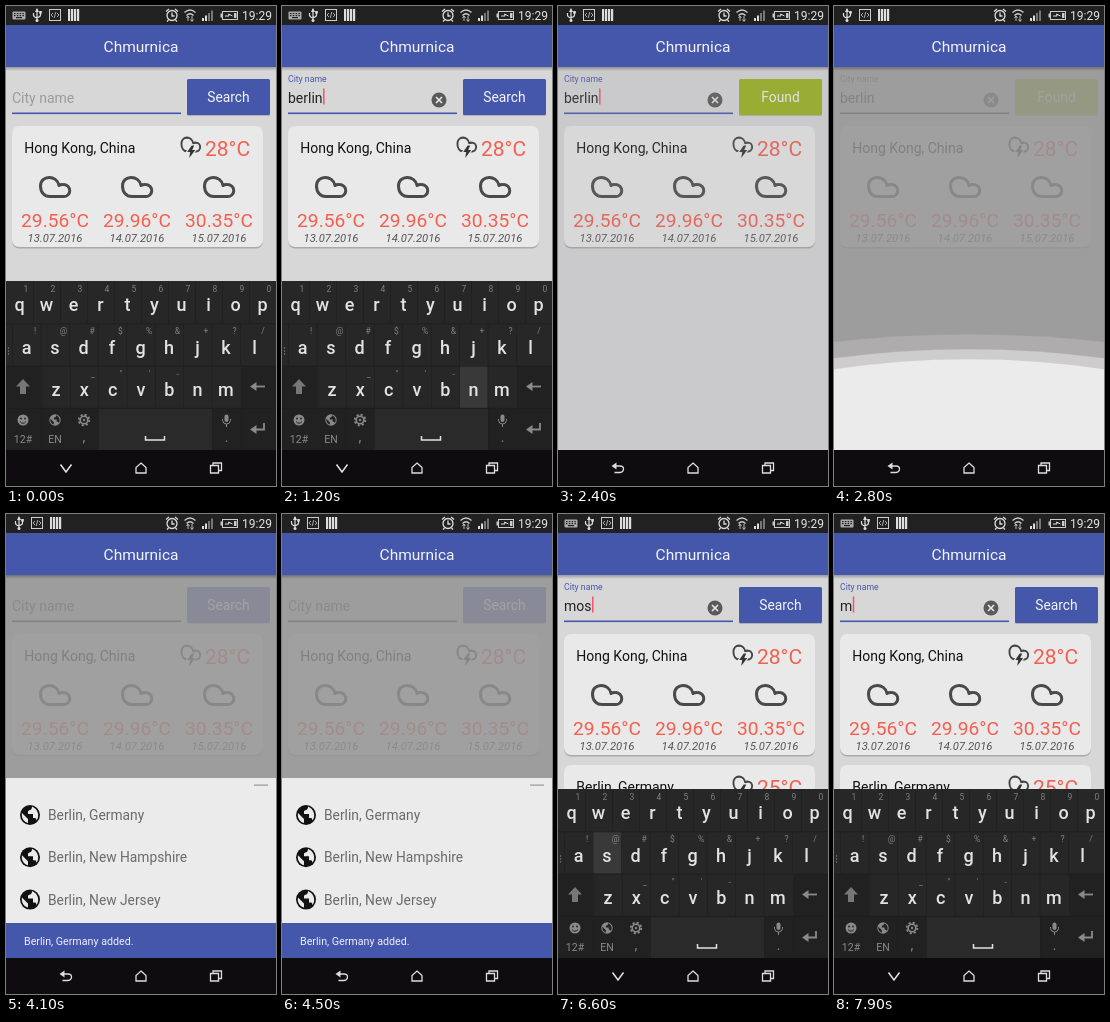
Animation of 270x480 px, one loop 8000 ms. Source, as an HTML page:

```html
<!DOCTYPE html>
<html lang="en">
<head>
<meta charset="utf-8">
<title>Weather app</title>
<style>
  html, body { margin: 0; width: 100%; height: 100%; overflow: hidden; background: #000; }
  svg { display: block; width: 100vw; height: 100vh; }
  text { font-family: Roboto, "Noto Sans", sans-serif; white-space: pre; }
</style>
</head>
<body>
<svg id="stage" viewBox="0 0 270 480" xmlns="http://www.w3.org/2000/svg"></svg>
<script>
const LOOP = 8000;
const INDIGO = '#4457ab', RED = '#f2604f', LIGHT = '#e9e9ea';

// Markup helpers
const rect = (x, y, w, h, fill, more = '') =>
  `<rect x="${x}" y="${y}" width="${w}" height="${h}" fill="${fill}" ${more}/>`;
const text = (str, x, y, size, fill, more = '') =>
  `<text x="${x}" y="${y}" font-size="${size}" fill="${fill}" ${more}>${str}</text>`;
const mid = (str, x, y, size, fill, more = '') =>
  text(str, x, y, size, fill, `text-anchor="middle" ${more}`);
const line = (d, color, w = 1, more = '') =>
  `<path d="${d}" fill="none" stroke="${color}" stroke-width="${w}" ${more}/>`;
const shape = (d, fill) => `<path d="${d}" fill="${fill}"/>`;
const dot = (x, y, r, fill, more = '') => `<circle cx="${x}" cy="${y}" r="${r}" fill="${fill}" ${more}/>`;
const group = (id, body, more = '') => `<g id="${id}" ${more}>${body}</g>`;
const at = (x, y, body) => `<g transform="translate(${x} ${y})">${body}</g>`;

// Weather card
const cloud = (color, w) => line(
  'M-5 9.600H8.500A6 6 0 0 0 9-2.400Q6-3 4-1.500C2-12.500-14.500-12-14.500-1C-14.500 5-11 9.600-5 9.600Z',
  color, w, 'stroke-linejoin="round"');
const bolt = 'M1 1L-3.500 7.500H-.5L-1.500 13.500L4.500 5.500H1.500L3.500 1Z';
const storm = `<g transform="scale(.64 .72)">${cloud('#444', 3)}</g>`
  + line(bolt, LIGHT, 2.400) + shape(bolt, '#333');

function card(y, city, temp, days) {
  return at(6, y,
    rect(0, .5, 251, 121, '#aaa', 'rx="7"') + rect(0, -1, 251, 121, LIGHT, 'rx="7"')
    + text(city, 12.300, 26, 14, '#111') + at(178.700, 17.500, storm)
    + text(temp, 193, 28.500, 21, RED)
    + days.map(([deg, date], i) => {
      const x = 43 + 82 * i;
      return at(x, 60, cloud('#4a4a4a', 3))
        + mid(deg, x, 100, 19.200, RED)
        + mid(date, x, 115, 11.300, '#555', 'font-style="italic"');
    }).join(''));
}

const globe = (r, fg, bg) => dot(0, 0, r, fg)
  + `<g transform="scale(${r / 10})">`
  + shape('M-8-2L-2 4V8C-6 7-9 3-8-2ZM2-8.500C2-5 0-5-2-4V-1H3V3H5C6 3 6.500 5 6.500 5.500C10 1 8-6 2-8.500Z', bg) + '</g>';

// Keyboard
const ROW = 42.300, TOP = 275;
const rows = [
  { keys: 'qwertyuiop', hints: '1234567890', x: 13.500, step: 27 },
  { keys: 'asdfghjkl', hints: '!@#$%&+?/', x: 20.500, step: 28.500 },
  { keys: 'zxcvbnm', hints: ' _"\'-  ', x: 50, step: 28.300 },
];
const KEY = '#e2e2e2', ICON = '#8a8a8a', HINT = '#808080', EDGE = '#1f1e1f', SIDE = '#222122';
const escapeChar = c => c === '&' ? '&amp;' : c;
const hit = {};

function keyboard() {
  let out = rect(0, TOP, 270, 170, '#282728')
    + rect(0, TOP + 2 * ROW, 35, ROW, SIDE) + rect(235, TOP + 2 * ROW, 35, ROW, SIDE)
    + rect(0, TOP + 3 * ROW, 270, ROW, SIDE) + rect(92, TOP + 3 * ROW + 1, 114, ROW, '#2b2a2b')
    + rect(0, 0, 0, 0, '#3a393a', 'id="press"');
  for (let r = 1; r < 4; r++) out += rect(0, TOP + r * ROW, 270, 1, EDGE);
  rows.forEach(({ keys, hints, x, step }, r) => [...keys].forEach((c, i) => {
    const cx = x + i * step, y = TOP + r * ROW;
    hit[c] = [cx - step / 2, y, step];
    if (i || r) out += rect(cx - step / 2, y, .6, ROW, EDGE);
    out += mid(c, cx, y + 30.300, 18, KEY, 'font-weight="500"')
      + mid(escapeChar(hints[i]), cx + (r ? 8.500 : 6.500), y + 11, 8.500, HINT);
  }));
  hit['<'] = [235, TOP + 2 * ROW, 35];
  [35, 63, 92, 206, 235].forEach(x => out += rect(x, TOP + 3 * ROW, .6, ROW, EDGE));
  out += [0, 3, 6].map(d => dot(2.500, 342 + d, .7, HINT)).join('')
    + shape('M17 373L24 380.500H20V388H14V380.500H10Z', '#777')
    + line('M259 380.500H249', ICON, 1.8) + shape('M244 380.500L250.500 376V385Z', ICON);
  // Bottom row
  out += dot(17, 414, 5.500, ICON) + dot(15, 412.500, .9, SIDE) + dot(19, 412.500, .9, SIDE)
    + line('M14 415.500Q17 419 20 415.500', SIDE)
    + at(49, 414, globe(5.700, ICON, SIDE))
    + dot(78, 414, 3.800, 'none', `stroke="${ICON}" stroke-width="1.6"`)
    + dot(78, 414, 5.300, 'none', `stroke="${ICON}" stroke-width="1.8" stroke-dasharray="2.1 2.06"`)
    + dot(78, 414, 1.200, ICON)
    + mid('12#', 17, 437, 10.500, ICON) + mid('EN', 49, 437, 10.500, ICON) + mid(',', 78, 436, 14, ICON)
    + line('M139.500 430V434H158.500V430', KEY, 1.5)
    + rect(218.500, 408.500, 4, 7.500, ICON, 'rx="2"')
    + line('M216.500 413V414.500Q217 418 220.500 418T224.500 414.500V413M220.500 418V421', ICON)
    + mid('.', 220.500, 436, 14, ICON)
    + line('M258 417V423.500H249', ICON, 1.8) + shape('M244 423.500L250.500 419V428Z', ICON);
  return out;
}

// System bars
function statusBar() {
  const usb = line('M0-6V6M-3.500-2V0Q-3.500 2 0 3M3.500-3V0Q3.500 2 0 2.500', '#ddd', 1.2)
    + shape('M-2-3L0-7L2-3Z', '#ddd') + dot(0, 5.500, 1.5, '#ddd') + rect(2.200, -4, 2.600, 2.600, '#ddd');
  const code = rect(-5.500, -5.500, 11, 11, 'none', 'stroke="#ccc"')
    + line('M-2-2L-4 0L-2 2M2-2L4 0L2 2M.8-3L-.8 3', '#ccc', .8);
  const bars = [-5, -2, 1, 4].map(x => rect(x, -6, 2.200, 12, '#ddd')).join('');
  let keys = rect(-6.500, -4, 13, 8, '#aaa', 'rx="1"') + rect(-3, 1.500, 6, 1.2, '#222');
  for (let i = 0; i < 8; i++) keys += rect(-5 + (i % 4) * 2.800, i < 4 ? -2.500 : -.5, 1.500, 1.200, '#222');
  return rect(0, 0, 270, 19, '#222122')
    + group('kbIcon', at(13, 9.500, keys))
    + group('notes', at(13, 9, usb) + at(31, 9, code) + at(49, 9, bars))
    + dot(166, 9.500, 5, 'none', 'stroke="#ddd" stroke-width="1.3"')
    + line('M166 6.500V10H168.500M160 5.500L163 3M172 5.500L169 3M162.500 14L161 15.500M169.500 14L171 15.500', '#ddd', 1.300)
    + line('M178.500 6.500Q184 1.500 189.500 6.500M180.500 9.500Q184 6 187.500 9.500', '#ccc', 1.3)
    + line('M182 15V10.500M180.500 12L182 10L183.500 12M186 10V15M184.500 13.500L186 15.500L187.500 13.500', '#ccc', .9)
    + [0, 1, 2, 3].map(i => rect(196 + i * 3, 12 - i * 2.500, 2, 3 + i * 2.500, i < 2 ? '#ddd' : '#777')).join('')
    + rect(216.500, 5.500, 15, 8, 'none', 'stroke="#ccc"') + rect(214.500, 7.500, 1.500, 4, '#ccc')
    + rect(228, 7, 2.500, 5, '#ccc') + line('M219 10H223L222.500 8L226.500 10', '#ddd', 1)
    + text('19:29', 236, 13.700, 12, '#e4e4e4');
}

function navBar() {
  return rect(0, 444, 270, 36, '#0e0c0e')
    + group('navDown', line('M54.500 458.500L60 466L65.500 458.500', '#e4e4e4', 1.500))
    + group('navBack', shape('M53.500 460L58.500 456.500V463.500Z', '#ddd')
      + line('M57 460H62Q65.500 460 65.500 463T62 466.500H56.500', '#ddd', 1.300))
    + line('M135 457L140 461.500V467H130V461.500Z', '#ddd', 1.300)
    + line('M204.500 459.500H212.500V467H204.500ZM207 459V457H215.500V464.500H213', '#ddd', 1.300);
}

const cities = ['Berlin, Germany', 'Berlin, New Hampshire', 'Berlin, New Jersey'];
const stage = document.getElementById('stage');
stage.innerHTML =
  `<defs><linearGradient id="shade" x2="0" y2="1"><stop stop-opacity=".28"/><stop offset="1" stop-opacity="0"/></linearGradient></defs>`
  + rect(0, 0, 270, 480, '#d7d7d8')
  + text('City name', 6, 97, 14, '#9b9b9b', 'id="label"')
  + text('', 6, 97, 14, '#222', 'id="field"')
  + rect(0, 82.500, 1.500, 16, '#f0566a', 'id="caret"')
  + rect(6, 106.500, 169, 1.600, INDIGO, 'id="rule"')
  + group('clear', dot(157, 94, 7.500, '#5a5a5a') + line('M154 91L160 97M160 91L154 97', '#e8e8e8', 1.600))
  + rect(181, 74, 83, 36, '#999', 'rx="1.5" opacity=".6"')
  + rect(181, 73, 83, 36, INDIGO, 'rx="1.5" id="button"')
  + mid('Search', 222.500, 96, 13.800, '#f4f4f8', 'id="caption"')
  + card(121, 'Hong Kong, China', '28°C', [['29.56°C', '13.07.2016'], ['29.96°C', '14.07.2016'], ['30.35°C', '15.07.2016']])
  + group('added', card(252, 'Berlin, Germany', '25°C', []))
  + rect(0, 61, 270, 383, '#949394', 'id="dim"')
  + ['#afacad', '#cecccd', '#ebebeb'].map((c, i) => `<path id="wave${i}" fill="${c}"/>`).join('')
  + group('list', rect(248, 270.500, 14, 1.200, '#999')
    + cities.map((c, i) => at(24, 301 + i * 42.300, globe(10, '#111', '#ebebeb') + text(c, 18, 5, 13.800, '#6a6a6a'))).join(''))
  + group('snack', rect(0, 0, 270, 36, INDIGO) + text('Berlin, Germany added.', 18, 22, 10.700, '#eef'))
  + rect(0, 61, 270, 4, 'url(#shade)') + rect(0, 18.500, 270, 42.500, INDIGO)
  + mid('Chmurnica', 135, 46, 15.500, '#f4f4f8')
  + group('keys', keyboard())
  + statusBar() + navBar();

const el = {};
stage.querySelectorAll('[id]').forEach(n => el[n.id] = n);
const set = (id, props) => { for (const k in props) el[id].setAttribute(k, props[k]); };
const move = (id, x, y) => set(id, { transform: `translate(${x} ${y})` });

// Typing: time and key; '<' deletes one letter, '' empties the field
const strokes = [
  [100, 'b'], [350, 'e'], [550, 'r'], [800, 'l'], [1000, 'i'], [1150, 'n'], [3850, ''],
  [5900, 'm'], [6200, 'o'], [6500, 's'], [6750, 'k'], [7000, 'a'],
  [7300, '<'], [7450, '<'], [7580, '<'], [7700, '<'],
];

const clamp = v => Math.min(1, Math.max(0, v));
const ramp = (t, from, to) => clamp((t - from) / (to - from));
const ease = u => u < .5 ? 4 * u ** 3 : 1 - 4 * (1 - u) ** 3;
const span = (t, a, b, c, d) => ease(ramp(t, a, b)) - ease(ramp(t, c, d));

function drawField(t, kb) {
  let value = '', last = null;
  for (const s of strokes) {
    if (s[0] > t) break;
    value = s[1] === '<' ? value.slice(0, -1) : s[1] && value + s[1];
    last = s;
  }
  el.field.textContent = value;
  const lift = span(t, 100, 280, 3850, 4030) + ease(ramp(t, 5900, 6080));
  const idle = t > 2700 && t < 4900;
  set('label', {
    y: 97 - 21.500 * lift, 'font-size': 14 - 5.300 * lift,
    fill: idle ? '#555' : lift > .5 ? INDIGO : '#9b9b9b',
  });
  set('rule', { fill: idle ? '#222' : INDIGO });
  set('clear', { opacity: value ? 1 : 0 });

  const since = t - (t >= 4900 && t < 5900 ? 4900 : last ? last[0] : -500);
  set('caret', {
    x: value ? 6.500 + el.field.getComputedTextLength() : 6,
    opacity: !idle && Math.floor(since / 500) % 2 === 0 ? 1 : 0,
  });

  const box = kb > .9 && last && t - last[0] < 130 && hit[last[1]];
  set('press', box ? { x: box[0], y: box[1], width: box[2], height: ROW } : { width: 0 });
}

function drawSheet(t) {
  const down = ease(ramp(t, 4600, 4950));
  [2529, 2545, 2555].forEach((start, i) => {
    const up = ease(ramp(t, start, start + 500));
    const y = 444 - 180 * (up - down);
    const bend = (8 + i) / 2 * Math.sin(Math.PI * up) * (1 - down);
    set('wave' + i, { d: `M0 ${y + bend}Q135 ${y - 3 * bend} 270 ${y + bend}V444H0Z` });
  });
  set('list', { opacity: ramp(t, 3050, 3350) * (down < 1 ? 1 : 0) });
  move('list', 0, 180 * down);
  set('dim', { opacity: .85 * (ramp(t, 2310, 2700) - ramp(t, 4600, 4950)) });
}

function draw(t) {
  const kb = 1 - span(t, 1450, 1750, 4950, 5200);
  drawField(t, kb);
  drawSheet(t);
  move('keys', 0, 169 * (1 - kb));
  const shown = kb > .5;
  set('kbIcon', { opacity: +shown });
  set('navDown', { opacity: +shown });
  set('navBack', { opacity: +!shown });
  move('notes', shown ? 18 : 0, 0);

  const found = t >= 2200 && t < 3850;
  set('button', { fill: found ? '#9ab31c' : INDIGO });
  el.caption.textContent = found ? 'Found' : 'Search';

  const snack = span(t, 3850, 4050, 5320, 5450);
  move('snack', 0, 444 - 169 * kb - 35 * snack);
  set('snack', { opacity: snack > 0 ? 1 - .1 * ramp(t, 5200, 5300) : 0 });
  set('added', { opacity: ramp(t, 5150, 5350) });
}

function tick() {
  draw(performance.now() % LOOP);
  requestAnimationFrame(tick);
}
tick();
</script>
</body>
</html>
```
